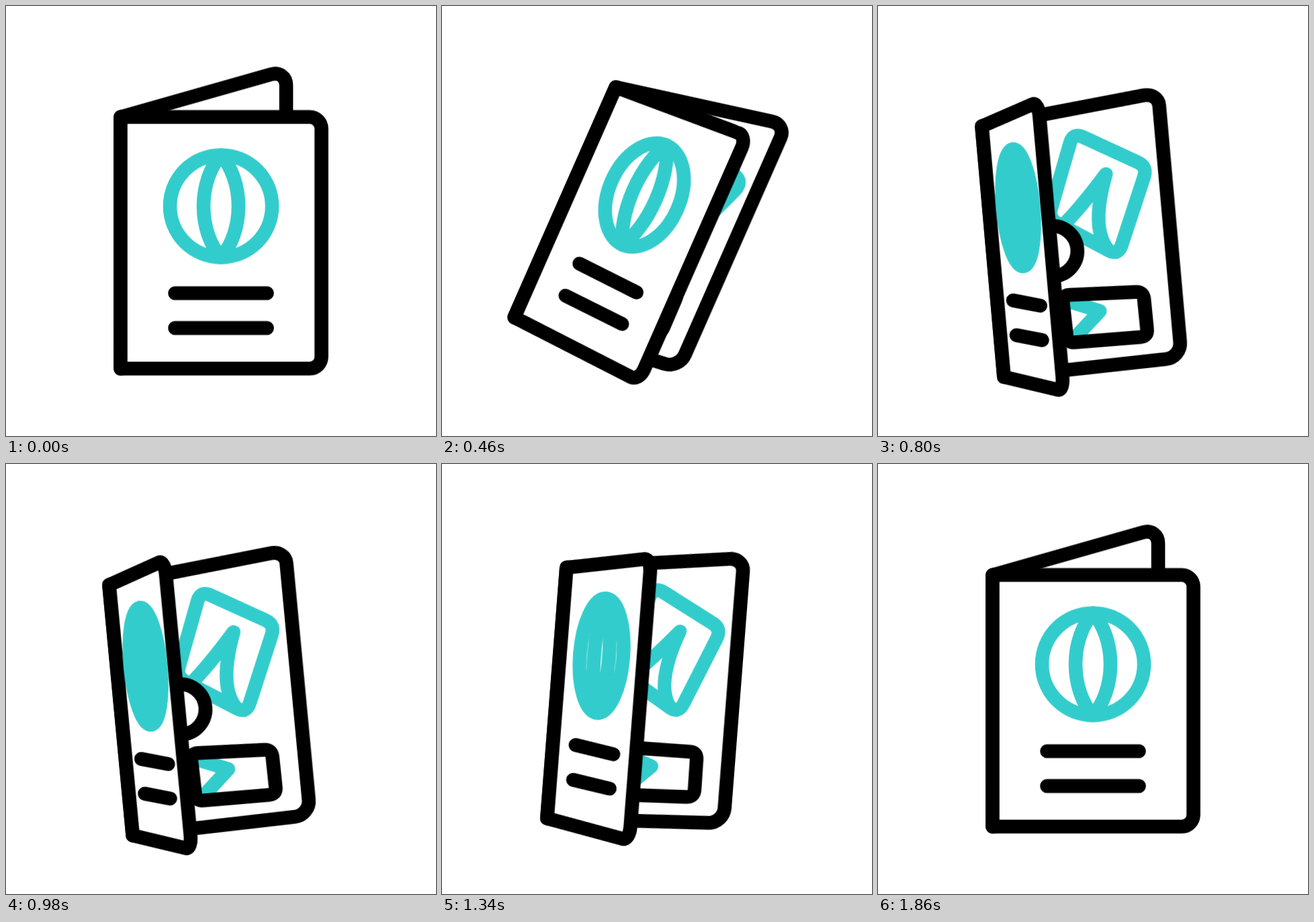
An HTML page without scripts that plays this animation: 640x640 px, repeating every 2.4 s.

```html
<!DOCTYPE html>
<html lang="en">
<head>
<meta charset="utf-8">
<title>Passport</title>
<style>
  html, body { margin: 0; width: 100%; height: 100%; overflow: hidden; background: #fff; }
  svg { display: block; width: 100vw; height: 100vh; }

  .book, .inside, .morph, .globe {
    animation: 2400ms cubic-bezier(.333, 0, .667, 1) infinite;
  }
  .book {
    fill: none; stroke: #000; stroke-width: 20.6;
    stroke-linecap: round; stroke-linejoin: round;
    animation-name: swing;
  }
  .teal { stroke: #3cc; }
  .paper { fill: #fff; }
  .inside { animation-name: lean; }
  .morph { d: var(--shut); animation-name: morph; }
  .globe { animation-name: squeeze; }

  @keyframes swing {
    0%, .42% { transform: rotate(0deg); animation-timing-function: cubic-bezier(.383, 0, .717, 1); }
    20.17% { transform: rotate(24deg); }
    36.42% { transform: rotate(-8deg); }
    52.58% { transform: rotate(6deg); }
    65% { transform: rotate(-3deg); }
    77.5%, 100% { transform: rotate(0deg); }
  }
  /* the cover opens, stays open, then closes */
  @keyframes morph {
    0%, 6.58%, 72.08%, 100% { d: var(--shut); }
    34.58%, 49.79% { d: var(--open); }
  }
  @keyframes squeeze {
    0%, 6.58%, 72.08%, 100% { cx: 0px; cy: -54.4px; rx: 76px; ry: 76px; }
    34.58%, 49.79% { cx: -107px; cy: -61.8px; rx: 22.5px; ry: 87.5px; }
  }
  /* page contents, tilting with the page */
  @keyframes lean {
    0%, 6.58%, 72.08%, 100% { transform: translate(-149.5px, 20px) skewY(-16.2deg) scaleX(.928) translate(149.5px, 0px); }
    34.58%, 49.79% { transform: translate(-149.5px, 0px) skewY(0deg) scaleX(1) translate(149.5px, 0px); }
  }

  .page {
    --shut: path("M-149.5,-187.2 L75,-250.8 C87.1,-254.2 97,-246.9 97,-234.5 L97,118 C97,130.1 87.6,141.8 76,144 L-149.5,187.2 Z");
    --open: path("M-149.5,-187.2 L95,-211.7 C106.7,-212.9 116.2,-205.3 116.2,-195 L116.2,159 C116.2,171.5 105.8,181.9 93,182.2 L-149.5,187.2 Z");
  }
  .cover {
    --shut: path("M-149.5,-187.2 L132,-187.2 C141.6,-187.2 149.5,-179.4 149.5,-169.7 L149.5,169.7 C149.5,179.4 141.6,187.2 132,187.2 L-149.5,187.2 Z");
    --open: path("M-149.5,-187.2 L-72,-213.7 C-67.6,-215.2 -64,-206.7 -64,-195 L-64,195 C-64,206.7 -67.6,215.2 -72,213.7 L-149.5,187.2 Z");
  }
  .lens {
    --shut: path("M0,-130.4 C-15.5,-113.4 -26,-85.4 -26,-54.4 C-26,-23.4 -15.5,4.6 0,21.6 C15.5,4.6 26,-23.4 26,-54.4 C26,-85.4 15.5,-113.4 0,-130.4 Z");
    --open: path("M-107,-149.3 C-111.6,-129.7 -114.7,-97.5 -114.7,-61.8 C-114.7,-26.1 -111.6,6.1 -107,25.7 C-102.4,6.1 -99.3,-26.1 -99.3,-61.8 C-99.3,-97.5 -102.4,-129.7 -107,-149.3 Z");
  }
  .lines {
    --shut: path("M-68.5,75 L68.5,75 M-68.5,126.9 L68.5,126.9");
    --open: path("M-126.4,75 L-87.1,86.4 M-126,127 L-88.9,137.8");
  }
</style>
</head>
<body>
<svg viewBox="0 0 640 640">
  <g transform="translate(320 352.4)">
    <g class="book">
      <path class="page paper morph"/>

      <g class="inside">
        <!-- picture with a tower -->
        <g class="teal">
          <path d="M-1.1,-158 L76.8,-113.4 Q90.7,-105.5 84.4,-90.8 L42.1,7.7 Q35.8,22.4 22.4,13.7 L-49.7,-33.2 Q-63.1,-41.9 -57.3,-56.8 L-20.8,-151 Q-15,-165.9 -1.1,-158 Z"/>
          <path d="M-43,-29 Q-15,-52 28.2,-100 Q-2,-22 21.6,12.8"/>
        </g>
        <circle class="paper" cx="-61.5" cy="7" r="37.5"/>
        <!-- box with an arrow -->
        <path class="teal" d="M-48,82 L1.3,102.3 L-42,141"/>
        <path d="M-41.5,74.2 L57.2,78.7 Q68.2,79.2 68.4,90.2 L68.9,135.4 Q69.1,146.4 58.1,146.3 L-40.1,145.3 Q-51.1,145.2 -51.3,134.2 L-52.3,84.7 Q-52.5,73.7 -41.5,74.2 Z"/>
      </g>

      <path class="cover paper morph"/>
      <g class="teal">
        <ellipse class="globe" cx="0" cy="-54.4" rx="76" ry="76"/>
        <path class="lens morph"/>
      </g>
      <path class="lines morph"/>
    </g>
  </g>
</svg>
</body>
</html>
```
